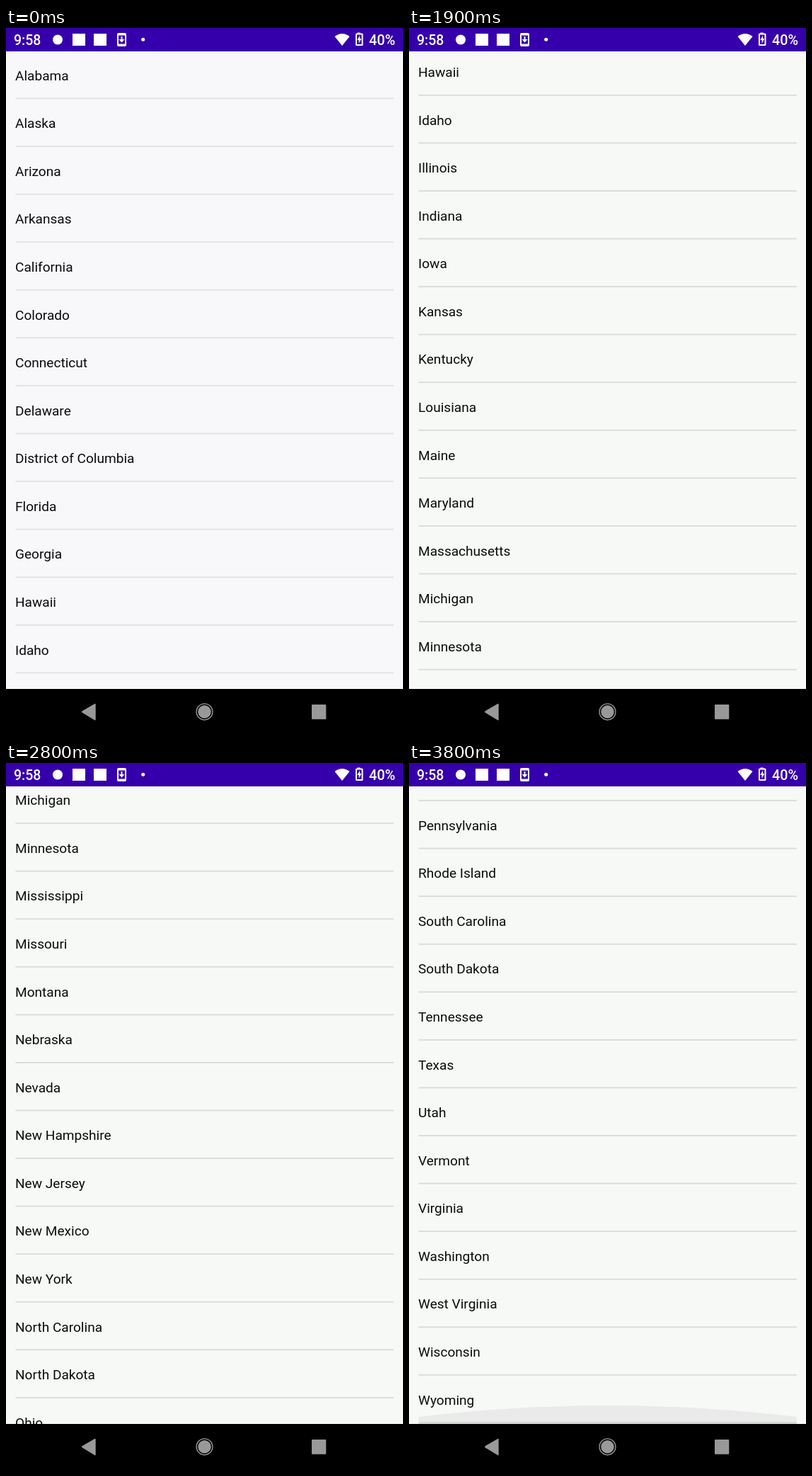
These frames come from a looping animation (561x998 px, 8900 ms). An HTML page with a canvas:

```html
<!DOCTYPE html>
<html lang="en">
<head>
<meta charset="utf-8">
<title>Scrolling list</title>
<style>
  html, body { margin: 0; width: 100%; height: 100%; overflow: hidden; background: #000; }
  canvas { display: block; }
</style>
</head>
<body>
<canvas id="stage" width="561" height="998"></canvas>
<script>
const ctx = document.getElementById('stage').getContext('2d', { alpha: false });
const W = 561, H = 998, LOOP = 8900, STEP = 100;
const LIST_TOP = 33, LIST_BOTTOM = 933, ROW = 67.57, MAX_SCROLL = 2546.6;
const LEFT = 13.5, RIGHT = 547.8;

const states = ('Alabama,Alaska,Arizona,Arkansas,California,Colorado,Connecticut,Delaware,' +
  'District of Columbia,Florida,Georgia,Hawaii,Idaho,Illinois,Indiana,Iowa,Kansas,Kentucky,' +
  'Louisiana,Maine,Maryland,Massachusetts,Michigan,Minnesota,Mississippi,Missouri,Montana,' +
  'Nebraska,Nevada,New Hampshire,New Jersey,New Mexico,New York,North Carolina,North Dakota,' +
  'Ohio,Oklahoma,Oregon,Pennsylvania,Rhode Island,South Carolina,South Dakota,Tennessee,Texas,' +
  'Utah,Vermont,Virginia,Washington,West Virginia,Wisconsin,Wyoming').split(',');

// Each swipe starts at rest, speeds up under the finger and coasts to a stop.
const swipes = [
  { start: 1000, from: 0, distance: 797, rate: 5 },
  { start: 1900, from: 748, distance: 767, rate: 6.6 },
  { start: 2800, from: 1501, distance: 1441, rate: 3 },
];

function scrollAt(t) {
  const swipe = swipes.findLast(s => t >= s.start);
  if (!swipe) return 0;
  const x = swipe.rate * (t - swipe.start) / 1000;
  const eased = 1 - (1 + x) * Math.exp(-x);
  return Math.min(MAX_SCROLL, swipe.from + swipe.distance * eased);
}

function rect(x, y, w, h, color) {
  ctx.fillStyle = color;
  ctx.fillRect(x, y, w, h);
}

function circle(x, y, r, color) {
  ctx.fillStyle = color;
  ctx.beginPath();
  ctx.arc(x, y, r, 0, 2 * Math.PI);
  ctx.fill();
}

function ring(x, y, r, color, width) {
  ctx.strokeStyle = color;
  ctx.lineWidth = width;
  ctx.beginPath();
  ctx.arc(x, y, r, 0, 2 * Math.PI);
  ctx.stroke();
}

function shape(path, color) {
  ctx.fillStyle = color;
  ctx.fill(new Path2D(path), 'evenodd');
}

function text(string, x, y, font, color, align = 'left') {
  ctx.font = font + ' Roboto, sans-serif';
  ctx.fillStyle = color;
  ctx.textAlign = align;
  ctx.fillText(string, x, y);
}

function drawList(t) {
  const scroll = scrollAt(t), moving = t > 1000;
  rect(0, 0, W, H, moving ? '#f7f9f7' : '#f8f7fa');
  const divider = !moving ? '#e2e1e4' : t < 1900 ? '#dddae0' : '#d9dbd9';
  states.forEach((name, i) => {
    const y = i * ROW - scroll;
    if (y < -ROW || y > LIST_BOTTOM) return;
    text(name, 13, y + 73.7, '19.09px', '#0b0b0b');
    rect(LEFT, y + 98.6, RIGHT - LEFT, 1.8, divider);
  });
}

function drawTouch(t) {
  if (t < 1000 || t >= 1200) return;
  const y = 830 - scrollAt(t);
  circle(114, y, 15, '#f5f4f7');
  ring(114, y, 15.3, '#d9d8db', 2);
}

// Edge glow shown once the end of the list is reached.
function drawGlow(t) {
  if (t < 3700) return;
  const grow = t < 3800 ? 0.5 : 1;
  const side = LIST_BOTTOM - 10 * grow, control = side - 32 * grow;
  shape(`M${LEFT} ${LIST_BOTTOM}V${side}Q280.5 ${control} ${RIGHT} ${side}V${LIST_BOTTOM}Z`,
    'rgba(0,0,0,.06)');
}

function drawStatusBar() {
  rect(0, 0, W, LIST_TOP, '#3500ab');
  text('9:58', 11, 24, '500 19.5px', '#fff');
  circle(73, 16.5, 7, '#fff');
  rect(94, 8, 18, 17, '#fff');
  rect(124, 8, 18, 17, '#fff');
  shape('M159 7h9q2 0 2 2v15q0 2-2 2h-9q-2 0-2-2V9q0-2 2-2Z M159 10.5v12h9v-12Z', '#fff');
  shape('M162.5 12h2v4h3l-4 4.5-4-4.5h3Z', '#fff');
  circle(193.7, 16.3, 2.5, '#fff');
  shape('M464.5 12Q475 4 485.5 12L475 25Z', '#fff');
  shape('M496.5 7.5v-1h4v1h2.5q1.5 0 1.5 1.5v14.5q0 1.5-1.5 1.5h-7.5q-1.5 0-1.5-1.5V9' +
    'q0-1.5 1.5-1.5Z M496 9.5v13.5h6.5V9.5Z', '#fff');
  shape('M500 10.5v4.5h2.2l-3.6 7v-5h-2.2Z', '#fff');
  text('40%', 550, 24, '500 19.8px', '#fff', 'right');
}

function drawNavigationBar() {
  const gray = '#999';
  rect(0, LIST_BOTTOM, W, H - LIST_BOTTOM, '#000');
  shape('M107.5 964.3 125.2 954q1.5-.7 1.5 1v21q0 1.7-1.5 1l-17.7-10.7q-1.2-1 0-2Z', gray);
  circle(280.5, 965.3, 9.2, gray);
  ring(280.5, 965.3, 11.4, gray, 1.4);
  shape('M433 955h18.3q1 0 1 1v18.8q0 1-1 1h-18.3q-1 0-1-1v-18.8q0-1 1-1Z', gray);
}

function draw(now) {
  const t = Math.floor(now % LOOP / STEP) * STEP;
  drawList(t);
  drawTouch(t);
  drawGlow(t);
  drawStatusBar();
  drawNavigationBar();
  requestAnimationFrame(draw);
}

requestAnimationFrame(draw);
</script>
</body>
</html>
```
